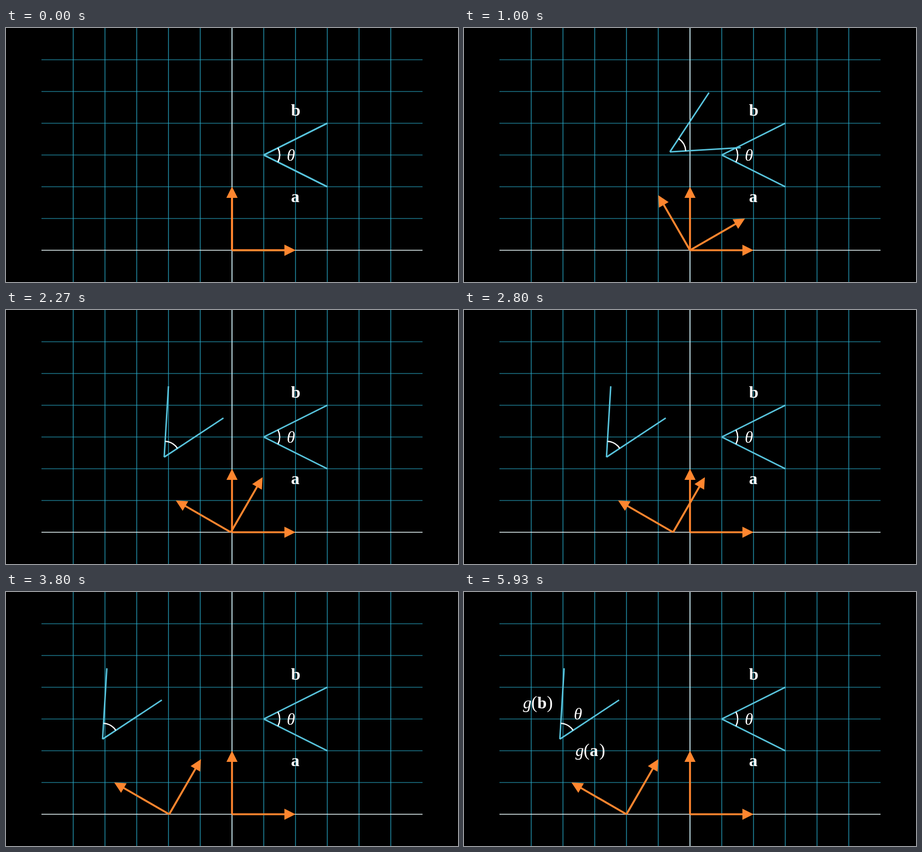
An HTML page that plays this animation: 854x480 px, repeating every 5990 ms.

```html
<!DOCTYPE html>
<html lang="en">
<head>
<meta charset="utf-8">
<title>Rotation and translation preserve angles</title>
<style>
  html, body { margin: 0; width: 100%; height: 100%; overflow: hidden; background: #000; }
  svg { display: block; width: 854px; height: 480px; }
  text { fill: #fff; font: 32px "Liberation Serif", serif; }
  .bold { font-weight: bold; }
  .ital { font-style: italic; }
  .paren { font-size: 34px; }
  .grid { stroke: #29abca; stroke-width: 1.2; }
  .side { stroke: #58c4dd; stroke-width: 2.8; }
  .arc { stroke: #fff; stroke-width: 2.4; }
  .shaft { stroke: #ff862f; stroke-width: 3.6; }
  .tip { fill: #ff862f; }
  path { fill: none; }
</style>
</head>
<body>
<svg viewBox="0 0 854 480">
  <rect width="854" height="480"/>
  <path id="grid" class="grid"/>
  <path d="M67 420H787" stroke="#e2f1f3" stroke-width="1.6"/>
  <path d="M427 0V480" stroke="#cfeff7" stroke-width="1.8"/>
  <defs>
    <g id="arrow">
      <path class="shaft" d="M0 0H100"/>
      <path class="tip" d="M120 0L99 -10.5V10.5Z"/>
    </g>
    <!-- Origin at the foot of the two arrows -->
    <g id="figure">
      <path class="side" d="M60 -180L180 -240M60 -180L180 -120"/>
      <path class="arc" d="M86.83 -193.42A30 30 0 0 1 86.83 -166.58"/>
      <use href="#arrow"/>
      <use href="#arrow" transform="rotate(-90)"/>
    </g>
  </defs>
  <use href="#figure" transform="translate(427 420)"/>
  <use href="#figure" id="moving"/>
  <text class="bold" x="538.5" y="165.5">b</text>
  <text class="bold" x="538.5" y="329">a</text>
  <text class="ital" x="530.5" y="251">θ</text>
  <g id="labels">
    <text class="ital" x="207.5" y="240.5">θ</text>
  </g>
</svg>
<script>
const LOOP = 5990, FPS = 15, TURN = 60, SHIFT = 120;
const $ = id => document.getElementById(id);
const moving = $("moving"), labels = $("labels");

let grid = "";
for (let x = 127; x <= 727; x += 60) if (x !== 427) grid += `M${x} 0V480`;
for (let y = 60; y <= 360; y += 60) grid += `M67 ${y}H787`;
$("grid").setAttribute("d", grid);

function addText(cls, x, y, str) {
  const t = document.createElementNS("http://www.w3.org/2000/svg", "text");
  t.setAttribute("class", cls);
  t.setAttribute("x", x);
  t.setAttribute("y", y);
  t.textContent = str;
  labels.append(t);
}

function addImage(letter, x, y) {
  addText("ital", x, y, "g");
  addText("paren", x + 15.5, y, "(");
  addText("bold", x + 27, y, letter);
  addText("paren", x + 45, y, ")");
}
addImage("b", 111.5, 220);
addImage("a", 210.5, 309.5);

const clamp = v => Math.min(1, Math.max(0, v));
const sigmoid = v => 1 / (1 + Math.exp(-v));
function smooth(v) {
  const low = sigmoid(-5);
  return clamp((sigmoid(10 * (v - 0.5)) - low) / (1 - 2 * low));
}

function draw(ms) {
  const sec = Math.floor((ms % LOOP + 4) * FPS / 1000) / FPS;
  const angle = TURN * clamp(sec / 2);
  const dx = SHIFT * smooth(clamp((sec - 2) / 2));
  moving.setAttribute("transform", `translate(${427 - dx} 420) rotate(${-angle})`);
  labels.setAttribute("visibility", sec >= 4 ? "visible" : "hidden");
}

const start = performance.now();
function tick() {
  draw(performance.now() - start);
  requestAnimationFrame(tick);
}
tick();
</script>
</body>
</html>
```
